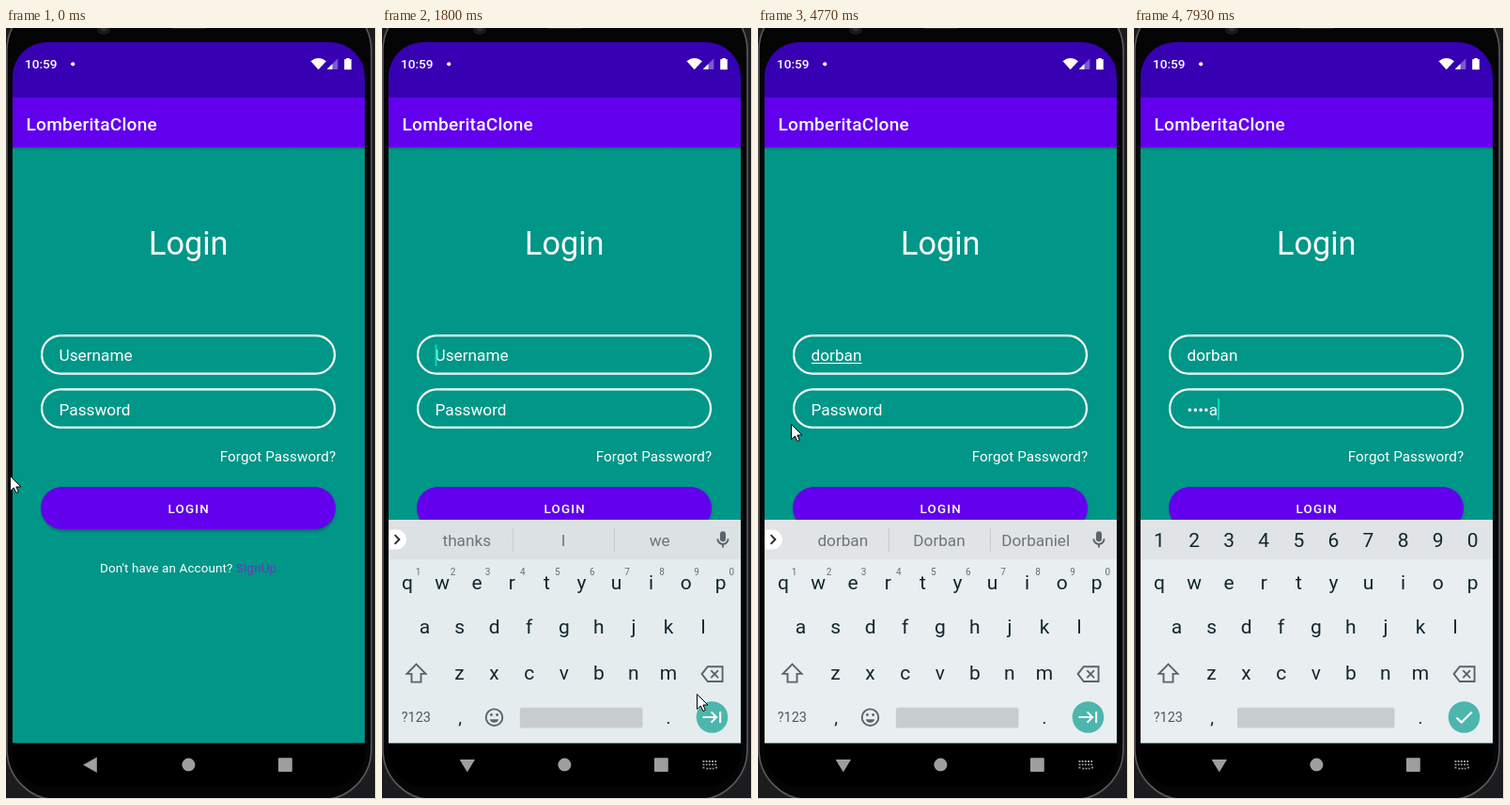
Recreate the animation shown at these times as an HTML page. Size 394x820 px, loop 8 s.

```html
<!DOCTYPE html>
<html lang="en">
<head>
<meta charset="utf-8">
<title>Login screen</title>
<style>
html, body { margin: 0; width: 100%; height: 100%; overflow: hidden; background: #1c1c1e; }
svg { display: block; width: 100vw; height: 100vh; font-family: Roboto, "Open Sans", sans-serif; }
text { white-space: pre; }
.mid { text-anchor: middle; }
.med { font-weight: 500; }
.key { font-size: 21px; fill: #12272e; text-anchor: middle; }
.hint { font-size: 10px; fill: #667075; text-anchor: middle; }
.word { font-size: 17.2px; fill: #6c7579; text-anchor: middle; }
.line { fill: none; stroke: #59646a; stroke-width: 1.9; }
.field { fill: none; stroke: #fff; stroke-width: 2.2; }
.entry { font-size: 17.2px; fill: #fff; }
</style>
</head>
<body>
<svg viewBox="0 0 394 820" preserveAspectRatio="none">
  <defs>
    <clipPath id="screen"><rect x="7" y="15" width="375" height="792" rx="37"/></clipPath>
    <linearGradient id="drop" x2="0" y2="1">
      <stop offset="0" stop-color="#000" stop-opacity=".22"/>
      <stop offset="1" stop-color="#000" stop-opacity="0"/>
    </linearGradient>
    <filter id="soft" x="-10%" y="-30%" width="120%" height="170%"><feGaussianBlur stdDeviation="1.5"/></filter>
  </defs>

  <!-- phone body -->
  <rect width="394" height="820" fill="#1c1c1e"/>
  <rect x="1" y="-30" width="388" height="851" rx="54" fill="#050506" stroke="#5a5a5d" stroke-width="1.6"/>
  <path d="M393.5 0V819.5H0" fill="none" stroke="#e4e4e4"/>
  <circle cx="104" cy="0" r="7.5" fill="#19191c"/>
  <circle cx="104" cy="0" r="3.5" fill="#2d2e38"/>
  <rect x="176" y="-4" width="38" height="5" rx="2.5" fill="#242426"/>

  <g clip-path="url(#screen)">
    <rect x="7" y="15" width="375" height="59" fill="#3700b3"/>
    <rect x="7" y="127" width="375" height="634" fill="#009688"/>
    <rect x="7" y="127" width="375" height="3" fill="url(#drop)"/>
    <rect x="7" y="74" width="375" height="53" fill="#6200ee"/>
    <rect x="7" y="760.5" width="375" height="47" fill="#000"/>

    <!-- status bar -->
    <g fill="#fff">
      <text class="med" x="20" y="43.3" font-size="13.6">10:59</text>
      <circle cx="71.2" cy="38.3" r="2.1"/>
      <path d="M324.5 35.2Q332.7 29 341 35.2L332.7 44.3Z"/>
      <path d="M353.3 32.5V44H341.8Z" opacity=".35"/>
      <path d="M347.5 38.3V44H341.8Z"/>
      <path d="M360.2 33.3H362.3V32H365.7V33.3H367.8V44.2H360.2Z"/>
    </g>
    <text class="med" x="21.5" y="108.5" font-size="19.1" letter-spacing=".24" fill="#fff">LomberitaClone</text>

    <!-- login form -->
    <g fill="#fff">
      <text class="mid" x="194.2" y="241" font-size="34.3">Login</text>
      <rect class="field" x="38.1" y="327.1" width="311.9" height="40.5" rx="20.2"/>
      <rect class="field" x="38.1" y="384.4" width="311.9" height="40.5" rx="20.2"/>
      <text class="entry" id="user" x="56.6" y="354.3"></text>
      <rect id="under" x="56.8" y="356" width="0" height="1"/>
      <text class="entry" id="pass" x="56.6" y="412"></text>
      <text x="351.2" y="460.6" font-size="15.26" letter-spacing=".05" text-anchor="end">Forgot Password?</text>
      <rect x="38" y="490" width="313" height="45" rx="22.5" fill="#000" opacity=".3" filter="url(#soft)"/>
      <rect x="37" y="488" width="314" height="45" rx="22.5" fill="#6200ee"/>
      <text class="mid med" x="194.8" y="515.5" font-size="13.36" letter-spacing="1.19">LOGIN</text>
      <text x="100" y="578.6" font-size="13.4" letter-spacing=".14">Don't have an Account?</text>
      <text x="245" y="578.6" font-size="13.4" letter-spacing=".14" fill="#673ab7">SignUp</text>
    </g>
    <rect id="caret" width="2" height="23" fill="#03dac5"/>

    <!-- keyboard -->
    <g id="board">
      <rect id="keys" x="7" y="523" width="375" height="237.5"/>
      <rect id="strip" x="7" y="523" width="375" height="42"/>
      <g id="letters"></g>
      <path class="line" d="M36.5 676.6L46.5 686.9H41.5V695.6H31.5V686.9H26.5Z"/>
      <path class="line" d="M346.8 679.2H362.6V695H346.8L340.6 687.1ZM350.3 683.1L358 691.1M358 683.1L350.3 691.1"/>
      <text class="mid" x="36.3" y="738.3" font-size="14.4" fill="#4c585e">?123</text>
      <text class="key" x="83" y="740" style="font-size:19px">,</text>
      <text class="key" x="305" y="740" style="font-size:19px">.</text>
      <rect id="space" y="722.8" height="21.7" rx="2" fill="#c8ccce"/>
      <circle cx="351.5" cy="733" r="16.8" fill="#4db6ac"/>
      <g id="plain">
        <path d="M7 533.6H15.5A10.5 10.5 0 0 1 15.5 554.6H7Z" fill="#fff"/>
        <path d="M13.6 539.2L18.4 544L13.6 548.8" fill="none" stroke="#222" stroke-width="1.8"/>
        <path d="M139.5 532V557M247.5 532V557" stroke="#c5cacd"/>
        <text class="word" x="90.3" y="551"></text>
        <text class="word" x="193" y="551"></text>
        <text class="word" x="295.7" y="551"></text>
        <rect x="360" y="535.3" width="6" height="11" rx="3" fill="#59646a"/>
        <path class="line" d="M357.4 543.3A5.6 5.6 0 0 0 368.6 543.3M363 548.8V552.5"/>
        <g id="hints"></g>
        <circle class="line" cx="119.5" cy="733.2" r="8.8"/>
        <path d="M114.8 735.2H124.2A4.9 4.9 0 0 1 114.8 735.2Z" fill="#59646a"/>
        <circle cx="116.4" cy="730.5" r="1.4" fill="#59646a"/>
        <circle cx="122.6" cy="730.5" r="1.4" fill="#59646a"/>
        <path d="M341.5 733H356M350.6 727.4L356.2 733L350.6 738.6M360.2 727.1V739.1" fill="none" stroke="#fff" stroke-width="2"/>
      </g>
      <g id="secret">
        <g id="digits"></g>
        <path d="M343.5 733.4L348.8 738.6L359.8 727.6" fill="none" stroke="#fff" stroke-width="2.1"/>
      </g>
    </g>

    <!-- navigation bar -->
    <g fill="#9e9e9e">
      <path id="back"/>
      <circle cx="194.4" cy="783.6" r="7"/>
      <rect x="290" y="776.2" width="14.8" height="14.8" rx="1"/>
      <path id="mini" d="M341.5 780H357M341.5 783.3H357M341.5 786.6H344M355 786.6H357M345.5 787.6H353.5" fill="none" stroke="#9e9e9e" stroke-width="1.8" stroke-dasharray="1.9 1.3"/>
    </g>
  </g>
  <path id="mouse" d="M-.5 .5V16.5L3.3 13L5.9 18.5L8.4 17.4L5.9 12H11Z" fill="#fff" stroke="#000" stroke-linejoin="round"/>
</svg>
<script>
const LOOP = 8000;
const $ = id => document.getElementById(id);
const words = document.querySelectorAll(".word");

// Each track lists [start time, value]; a value holds until the next one.
const pointer = [
  [0, [5, 476]], [400, [34, 466]], [530, [120, 437]], [660, [225, 404]], [800, [318, 380]],
  [930, [356, 372]], [1060, [338, 358]], [1290, [318, 352]], [1530, [316, 480]],
  [1650, [318, 627]], [1800, [336, 708]], [1920, [282, 628]], [2060, [170, 520]],
  [2200, [76, 444]], [2340, [36, 421]], [4900, [5, 428]], [5060, [76, 427]],
  [5200, [165, 422]], [5350, [240, 416]], [5640, [270, 412]], [5920, null]
];
const typed = [[0, ""], [3330, "d"], [3600, "do"], [3860, "dor"], [3980, "dorb"], [4240, "dorba"], [4370, "dorban"]];
const offers = [
  [0, "thanks I we"], [3460, "d D do"], [3730, "do Do don't"], [3860, "dor Dor for"],
  [4100, "dorb Dorb dorm"], [4370, "dorban Dorban Dorbaniel"]
];
const secret = [[0, ""], [7000, "d"], [7250, "•o"], [7530, "••r"], [7730, "•••b"], [7930, "••••a"]];
const blink = [
  [0, false], [1410, true], [1920, false], [2340, true], [2900, false], [3330, true],
  [4770, false], [5200, true], [6070, false], [6630, true]
];
const FOCUS = 5640, NUMBERS = 5770, NAV = 1650, BOARD = 1800;

function at(track, t) {
  let value = track[0][1];
  for (const [start, v] of track) if (t >= start) value = v;
  return value;
}

function row(id, chars, x, y, cls = "key") {
  [...chars].forEach((c, i) => {
    const el = document.createElementNS("http://www.w3.org/2000/svg", "text");
    el.setAttribute("class", cls);
    el.setAttribute("x", x + i * 37.08);
    el.setAttribute("y", y);
    el.textContent = c;
    $(id).append(el);
  });
}

function set(id, attrs) {
  for (const k in attrs) $(id).setAttribute(k, attrs[k]);
}

function show(id, on) {
  $(id).style.display = on ? "" : "none";
}

function write(el, s) {
  if (el.textContent !== s) el.textContent = s;
}

row("letters", "qwertyuiop", 27, 596.5);
row("letters", "asdfghjkl", 45.5, 644.4);
row("letters", "zxcvbnm", 82.5, 692.5);
row("hints", "1234567890", 38.5, 581.8, "hint");
row("digits", "1234567890", 27, 552);

function draw(t) {
  const name = at(typed, t), pin = at(secret, t), pos = at(pointer, t);
  const inPass = t >= FOCUS, numeric = t >= NUMBERS, fresh = t < 1920;

  write($("user"), name || "Username");
  write($("pass"), pin || "Password");
  const nameW = name ? $("user").getComputedTextLength() : 0;
  const pinW = pin ? $("pass").getComputedTextLength() : 0;
  set("under", { width: inPass ? 0 : nameW });
  set("caret", { x: 56.5 + (inPass ? pinW : nameW), y: inPass ? 394 : 336.6 });
  show("caret", at(blink, t));

  show("board", t >= BOARD);
  show("plain", !numeric);
  show("secret", numeric);
  set("keys", { fill: fresh ? "#e5ecee" : "#e9eef0" });
  set("strip", { fill: fresh ? "#dce2e4" : "#e0e4e6" });
  set("space", numeric ? { x: 110, width: 167.5 } : { x: 146.8, width: 130.7 });
  at(offers, t).split(" ").forEach((w, i) => write(words[i], w));

  const open = t >= NAV;
  set("back", { d: open ? "M82.6 778H99L90.8 791.5Z" : "M82 783.8L96.8 775.6V792Z" });
  show("mini", open);

  show("mouse", pos);
  if (pos) set("mouse", { transform: `translate(${pos})` });
}

const began = performance.now();
function tick() {
  draw((performance.now() - began) % LOOP);
  requestAnimationFrame(tick);
}
tick();
</script>
</body>
</html>
```
